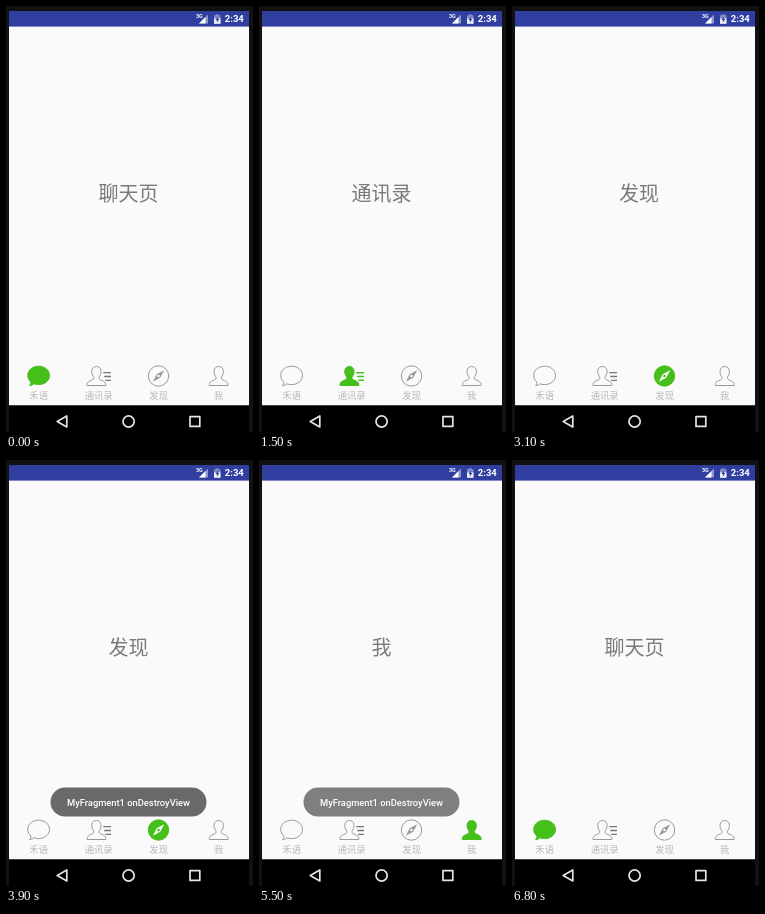
An HTML page for the animation above (7.9 s loop, 247 px wide and 426 px high).

```html
<!DOCTYPE html>
<html lang="zh-CN">
<head>
<meta charset="utf-8">
<title>Tab pager</title>
<style>
  html, body { margin: 0; width: 100%; height: 100%; overflow: hidden; background: #111; }
  svg { display: block; width: 247px; height: 426px; }
  text { font-family: "Noto Sans CJK SC", "Noto Sans CJK", "Noto Sans", sans-serif; text-anchor: middle; }
  .latin { font-family: Roboto, "Open Sans", sans-serif; fill: #fff; }
  .page { font-size: 20px; fill: #7a7a7a; }
  .label { font-size: 9.33px; fill: #b8b8b8; }
  .tab { fill: none; stroke: #999; stroke-width: 1; stroke-linejoin: round; }
  .tab .needle { fill: #999; stroke: none; }
  .tab .hub { fill: #fafafa; stroke: none; }
  .tab.on { fill: #45c01a; stroke: #45c01a; }
  .tab.on .needle { fill: #fff; }
  .tab.on .hub { fill: #45c01a; }
  .tab .rows { stroke: #777; stroke-width: 1.3; }
  .tab.on .rows { stroke: #45c01a; stroke-width: 1.6; }
  .nav { fill: none; stroke: #e4e4e4; stroke-width: 1.7; stroke-linejoin: round; }
</style>
</head>
<body>
<svg viewBox="0 0 247 426">
  <defs>
    <clipPath id="screen"><rect x="3" y="20" width="240" height="380"/></clipPath>
    <path id="person" d="M-9.4 379.5C-9.6 376.6-8.4 375.6-4.4 374C-2.2 373-2.2 371.8-3.2 370.2C-5.6 367-5.4 360.5 0 360.5C5.4 360.5 5.6 367 3.2 370.2C2.2 371.8 2.2 373 4.4 374C8.4 375.6 9.6 376.6 9.4 379.5Z"/>
  </defs>

  <rect width="247" height="426" fill="#111"/>
  <rect x="3" y="5" width="240" height="16" fill="#303f9f"/>
  <rect x="3" y="20.6" width="240" height="379" fill="#fafafa"/>
  <rect x="3" y="399.4" width="240" height="27" fill="#000"/>

  <!-- status bar -->
  <text class="latin" x="193.4" y="12.2" font-size="5.4" font-weight="700">3G</text>
  <path d="M202 8.5V17.5H193Z" fill="#fff" opacity=".45"/>
  <path d="M199.5 11V17.5H193Z" fill="#fff"/>
  <path d="M208 9.3H209.8V8.2H212.7V9.3H214.5V17.8H208Z" fill="#fff" opacity=".4"/>
  <path d="M208 12.4H214.5V17.8H208Z" fill="#fff" opacity=".85"/>
  <path d="M211.9 10.6L209.4 14H210.9V16.6L213.3 13H211.9Z" fill="#303f9f"/>
  <text class="latin" x="228.3" y="16.4" font-size="9.5" font-weight="700">2:34</text>

  <g clip-path="url(#screen)"><g id="pages"></g></g>

  <!-- tabs -->
  <g class="tab">
    <path d="M32.6 360.2C38.8 360.2 43.5 364.2 43.5 369.4C43.5 374.6 38.8 378.6 32.6 378.6C30.8 378.6 29.2 378.3 27.8 377.8C26.6 379 25.3 379.5 23.6 379.6C24.6 378.5 25 377.4 24.8 375.9C22.9 374.2 21.7 372 21.7 369.4C21.7 364.2 26.4 360.2 32.6 360.2Z"/>
  </g>
  <g class="tab">
    <use href="#person" x="90.4"/>
    <path class="rows" d="M97.3 366.7H105M98.2 370.5H105M99.3 374.3H105"/>
  </g>
  <g class="tab">
    <circle cx="152.5" cy="370" r="10.2"/>
    <path class="needle" d="M158.2 364.2L154.2 371.7L146.8 375.8L150.8 368.3Z"/>
    <circle class="hub" cx="152.5" cy="370" r="1.3"/>
  </g>
  <g class="tab"><use href="#person" x="212.7"/></g>
  <g id="labels"></g>

  <g id="toast">
    <rect x="44.5" y="327.5" width="156" height="29" rx="14.5" fill="#696969"/>
    <text class="latin" x="122.5" y="345.8" font-size="9.33" font-weight="500">MyFragment1 onDestroyView</text>
  </g>

  <!-- navigation bar -->
  <g class="nav">
    <path d="M51.2 415.5L60.8 410V421Z"/>
    <circle cx="122.6" cy="415.5" r="5.6"/>
    <rect x="184" y="410.6" width="9.8" height="9.8"/>
  </g>
</svg>

<script>
  const LOOP = 7900, STEP = 100, PAGE = 240, LEAD = 10;
  const titles = ["聊天页", "通讯录", "发现", "我"];
  const names = ["禾语", "通讯录", "发现", "我"];

  // A finger drags from `drag` to `drop` over `reach` pages, then the pager settles.
  // A tap has no drag.
  const moves = [
    { from: 0, to: 1, drag: 600, drop: 1100, reach: .5625, end: 1500 },
    { from: 1, to: 2, drag: 2000, drop: 2800, reach: .72, end: 3300 },
    { from: 2, to: 3, drag: 4400, drop: 5000, reach: .58, end: 5400 },
    { from: 3, to: 1, drag: 5890, drop: 5890, reach: 0, end: 6035 },
    { from: 1, to: 0, drag: 6600, drop: 6600, reach: 0, end: 6750 }
  ];

  const progress = (t, a, b) => Math.min(1, Math.max(0, (t - a) / (b - a)));
  const smooth = u => u * u * (3 - 2 * u);

  function pageAt(t) {
    const m = moves.filter(move => move.drag <= t).pop();
    if (!m) return 0;
    if (t <= m.drop && m.reach) return m.from + m.reach * progress(t, m.drag, m.drop) ** 1.15;
    const left = (1 - progress(t, m.drop, m.end)) ** 3;
    return m.to + (m.from + m.reach - m.to) * left;
  }

  function tabAt(t) {
    const m = moves.filter(move => move.drop < t).pop();
    return m ? m.to : 0;
  }

  const toastAt = t => progress(t, 3500, 3900) * (1 - smooth(progress(t, 5350, 5950)));

  function addText(parent, cls, x, y, content) {
    const el = document.createElementNS("http://www.w3.org/2000/svg", "text");
    el.setAttribute("class", cls);
    el.setAttribute("x", x);
    el.setAttribute("y", y);
    el.textContent = content;
    parent.append(el);
  }

  const pages = document.getElementById("pages");
  const labels = document.getElementById("labels");
  const toast = document.getElementById("toast");
  const tabs = document.querySelectorAll(".tab");

  titles.forEach((title, i) => addText(pages, "page", 122.6 + i * PAGE, 194.6, title));
  names.forEach((name, i) => addText(labels, "label", 32.7 + i * 60, 393.1, name));

  function draw(t) {
    pages.setAttribute("transform", `translate(${-PAGE * pageAt(t)} 0)`);
    toast.setAttribute("opacity", toastAt(t));
    const active = tabAt(t);
    tabs.forEach((tab, i) => tab.classList.toggle("on", i === active));
  }

  const start = performance.now() - LEAD;
  function tick() {
    const t = (performance.now() - start) % LOOP;
    draw(Math.floor(t / STEP) * STEP);
    requestAnimationFrame(tick);
  }
  tick();
</script>
</body>
</html>
```
